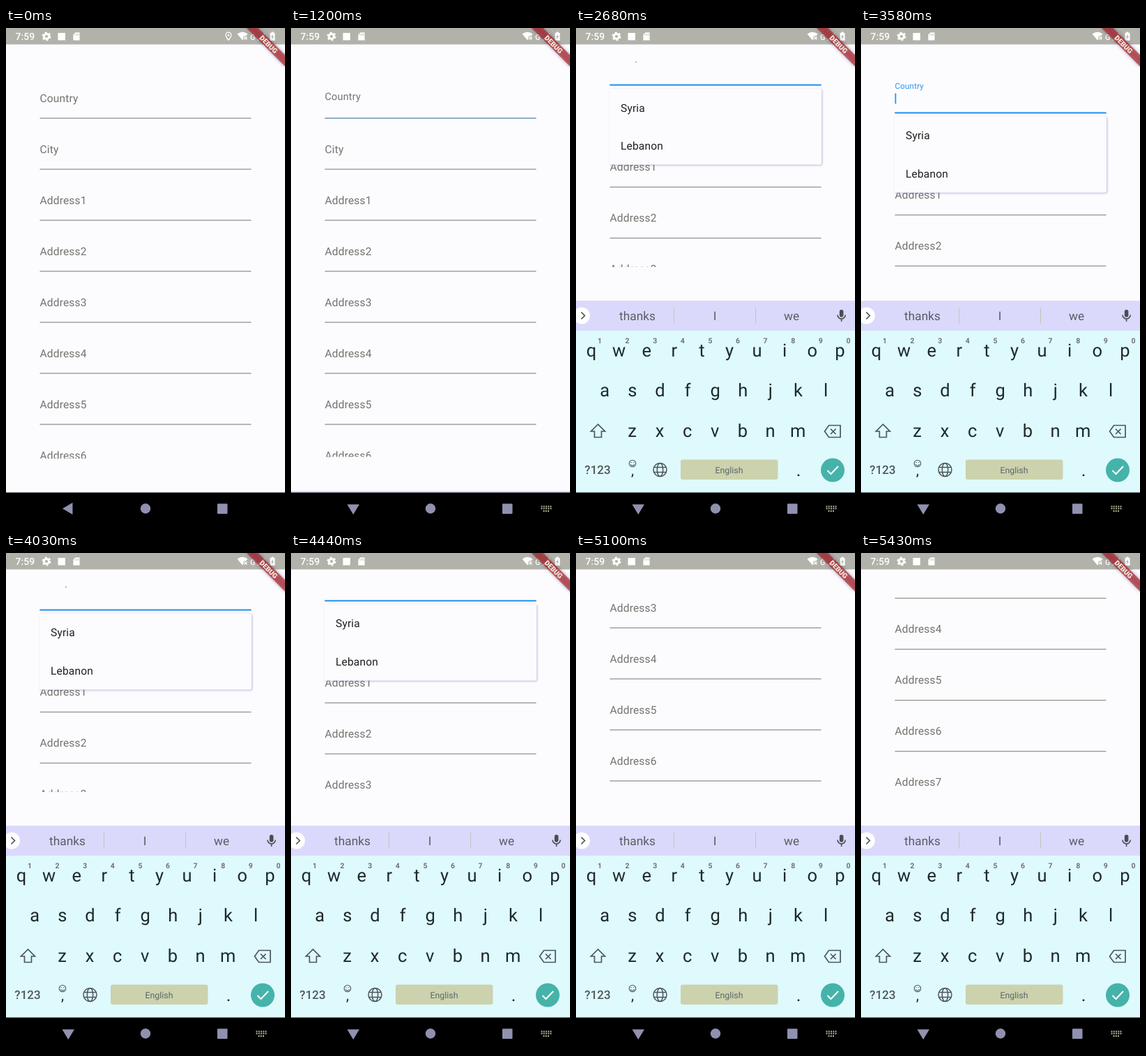
Recreate the animation shown at these times as an HTML page. Size 400 by 711 pixels, loop 6.91 s.

```html
<!DOCTYPE html>
<html lang="en">
<head>
<meta charset="utf-8">
<title>Address form with suggestions</title>
<style>
  html, body { margin: 0; width: 100%; height: 100%; overflow: hidden; background: #fcfcff; }
  svg { display: block; width: 100vw; height: 100vh; font-family: Roboto, sans-serif; }
  text { text-rendering: geometricPrecision; }
  .mid { text-anchor: middle; }
  .label { font-size: 15.57px; letter-spacing: .15px; fill: #73736f; }
  .option { font-size: 15.57px; letter-spacing: .15px; fill: #202020; }
  .word { font-size: 17.3px; fill: #5b5d66; }
  .key { font-size: 25.5px; fill: #1d2a2c; }
  .digit { font-size: 10.5px; font-weight: 700; fill: #70707c; }
  .stroke { fill: none; stroke: #4c5659; stroke-width: 1.7; }
  #panel { filter: drop-shadow(1px 1.5px 1.8px rgba(70, 70, 150, .38)); }
</style>
</head>
<body>
<svg viewBox="0 0 400 711">
  <defs>
    <clipPath id="viewport"><rect id="viewportBox" x="48" y="48" width="304" height="568"/></clipPath>
    <clipPath id="body"><rect y="380" width="400" height="284.5"/></clipPath>
    <filter id="blur" x="-20%" y="-100%" width="140%" height="300%"><feGaussianBlur stdDeviation="3"/></filter>
  </defs>
  <rect width="400" height="711" fill="#fcfcff"/>

  <g clip-path="url(#viewport)">
    <g id="list">
      <rect id="focusLine" x="48.5" y="128" width="303" height="2" fill="#2196f3"/>
      <rect id="caret" x="48.6" y="101" width="1.8" height="15" fill="#2196f3"/>
    </g>
  </g>

  <g id="panel">
    <rect id="panelBox" x="48" y="134" width="304" height="109" rx="2" fill="#fcfcff"/>
    <g id="options">
      <text class="option" x="64" y="167">Syria</text>
      <text class="option" x="64" y="221.5">Lebanon</text>
    </g>
  </g>

  <g clip-path="url(#body)">
    <g id="keyboard">
      <rect y="390" width="400" height="44" fill="#dad9fc"/>
      <rect y="433" width="400" height="232" fill="#dffafd"/>
      <circle cx="8" cy="411.5" r="12" fill="#fff"/>
      <path class="stroke" d="M7.5 406.5l5 5-5 5"/>
      <path d="M140.5 400v23M257.5 400v23" stroke="#c3c3b8"/>
      <text class="word mid" x="88" y="418">thanks</text>
      <text class="word mid" x="199" y="418">I</text>
      <text class="word mid" x="309" y="418">we</text>
      <rect x="377.8" y="403" width="5.6" height="10.5" rx="2.8" fill="#4c4c55"/>
      <path class="stroke" d="M375 410.5a5.6 5.6 0 0 0 11.2 0M380.6 416v4"/>
      <g id="keys"></g>
      <path class="stroke" d="M31.5 567l-10 10h5v8.5h10V577h5z"/>
      <path class="stroke" d="M362.5 568.5H379v17h-16.5l-6-8.5zM365 573.5l7.5 7.5m0-7.5l-7.5 7.5"/>
      <text class="mid" x="31" y="638" font-size="17" font-weight="500" fill="#50585b">?123</text>
      <g class="stroke" style="stroke-width:1.1">
        <circle cx="81" cy="623" r="4.8"/>
        <path d="M78.3 624.2a2.8 2.6 0 0 0 5.4 0M79.2 621v1M82.8 621v1"/>
      </g>
      <text class="key mid" x="81" y="640" style="font-size:21px">,</text>
      <g class="stroke" style="stroke-width:1.5">
        <circle cx="120.5" cy="632" r="9.5"/>
        <ellipse cx="120.5" cy="632" rx="4.2" ry="9.5"/>
        <path d="M112 628.5h17M112 635.5h17"/>
      </g>
      <rect x="150" y="617.5" width="139.5" height="28.5" rx="3" fill="#ccd2ad"/>
      <text class="mid" x="219.5" y="636.5" font-size="12.4" fill="#5c6769">English</text>
      <text class="key mid" x="319" y="640.5">.</text>
      <circle cx="368" cy="632.5" r="17" fill="#45b3aa"/>
      <path d="M360.5 633l5 5 10.5-11" fill="none" stroke="#fff" stroke-width="2"/>
    </g>
  </g>

  <rect y="664.5" width="400" height="47" fill="#000"/>
  <g fill="#9090b0">
    <path id="back" d="M81 687.5l14.5-8.5v17z"/>
    <path id="hide" d="M80.5 681.5h17.5l-8.75 14.5z"/>
    <circle cx="200" cy="687.5" r="7.2"/>
    <rect x="303" y="680.5" width="14.5" height="14.5" rx="1"/>
    <path id="switcher" d="M358.5 684.5h15M358.5 687.5h15M361.5 691h9" fill="none" stroke="#b4b498" stroke-width="1.8" stroke-dasharray="2 1.25"/>
  </g>

  <rect width="400" height="23.5" fill="#b2b2aa"/>
  <g fill="#fff">
    <text x="13.5" y="17" font-size="14" font-weight="500">7:59</text>
    <circle cx="58" cy="12" r="3.6" fill="none" stroke="#fff" stroke-width="3"/>
    <circle cx="58" cy="12" r="5.6" fill="none" stroke="#fff" stroke-width="1.8" stroke-dasharray="3 2.864"/>
    <rect x="74.5" y="7" width="10.5" height="10.5"/>
    <path d="M99.5 6h6.5v12H96V9.5zM99 8.5v2.5M101.5 8v3M104 8v3" stroke="#b2b2aa" stroke-width=".8"/>
    <path id="pin" fill-rule="evenodd" d="M319 5.5a4.5 4.5 0 0 1 4.5 4.5c0 3.2-4.5 8.5-4.5 8.5s-4.5-5.3-4.5-8.5a4.5 4.5 0 0 1 4.5-4.5zm0 1.3a3.2 3.2 0 0 0-3.2 3.2c0 2 3.2 6.2 3.2 6.2s3.2-4.2 3.2-6.2a3.2 3.2 0 0 0-3.2-3.2zm0 2a1.4 1.4 0 1 1-.01 0z"/>
    <path d="M331.5 8.5q7.5-5.5 15 0l-2.5 3h-3.5v4l-1.5 2z"/>
    <path d="M341.5 12.5l4 4m0-4l-4 4" stroke="#fff" stroke-width="1.2"/>
    <text x="350" y="16.5" font-size="11" font-weight="500">G</text>
    <path d="M360 17.5l10.5-10.5v10.5z"/>
    <path fill-rule="evenodd" d="M380.5 5.5h3v1.5h2v11h-7v-11h2zm2 3.5l-2.5 4h1.5v3l2.5-4h-1.5z"/>
  </g>

  <g transform="translate(400 0) scale(.973) rotate(45)">
    <rect x="-40" y="28" width="80" height="12" fill="#202060" opacity=".4" filter="url(#blur)"/>
    <rect x="-40" y="28" width="80" height="12" fill="#b71c1c" fill-opacity=".63"/>
    <text class="mid" y="37.7" font-size="10.2" font-weight="900" fill="#f6f0e0">DEBUG</text>
  </g>
</svg>

<script>
const LOOP = 6910, ROW = 73;
const $ = id => document.getElementById(id);
const clamp = x => Math.min(1, Math.max(0, x));
const progress = (t, start, end) => clamp((t - start) / (end - start));
const easeOut = p => 1 - (1 - p) ** 3;
const smooth = p => p * p * (3 - 2 * p);
const linear = p => p;
const show = (id, on) => $(id).setAttribute('visibility', on ? 'visible' : 'hidden');

function add(parent, tag, attrs, text = '') {
  const node = document.createElementNS('http://www.w3.org/2000/svg', tag);
  for (const name in attrs) node.setAttribute(name, attrs[name]);
  node.textContent = text;
  parent.append(node);
  return node;
}

// Form rows, placed below the focus line and caret
const names = ['Country', 'City', ...Array.from({ length: 10 }, (_, i) => 'Address' + (i + 1))];
const labels = names.map((name, i) => {
  const line = add($('list'), 'rect', { x: 48.5, y: 128.4 + ROW * i, width: 303, height: 1.3, fill: '#94948f' });
  $('list').prepend(line);
  return add($('list'), 'text', { class: 'label', x: 48.5, y: 105.6 + ROW * i }, name);
});

[['qwertyuiop', 22, 469.5], ['asdfghjkl', 41.3, 527], ['zxcvbnm', 80.5, 584.5]].forEach(([row, x, y], r) => {
  [...row].forEach((letter, i) => {
    add($('keys'), 'text', { class: 'key mid', x: x + 39.6 * i, y }, letter);
    if (r === 0) add($('keys'), 'text', { class: 'digit mid', x: 34 + 39.6 * i, y: 450.5 }, (i + 1) % 10);
  });
});

// [start, end, from, to, easing] for each drag or fling of the list
const scrolls = [
  [10, 330, 0, 146, easeOut],
  [460, 780, 146, 0, easeOut],
  [2360, 2680, 0, 47.5, easeOut],
  [2970, 3290, 47.5, 0, easeOut],
  [3579, 3580, 0, 7.5, linear],
  [3580, 4030, 7.5, 47.5, linear],
  [4030, 4810, 47.5, 72.4, linear],
  [4810, 5430, 72.4, 356.4, easeOut],
];

function scrollAt(t) {
  const last = scrolls.filter(s => t >= s[0]).pop();
  if (!last) return 0;
  const [start, end, from, to, ease] = last;
  return from + (to - from) * ease(progress(t, start, end));
}

function draw(t) {
  const offset = scrollAt(t);
  const focus = smooth(progress(t, 1140, 1320));
  const rise = easeOut(progress(t, 1200, 1520));
  const open = smooth(progress(t, 1400, 1730));
  const typing = t >= 1160;

  $('list').setAttribute('transform', `translate(0 ${-offset})`);
  $('viewportBox').setAttribute('height', 568 - 274 * rise);
  $('focusLine').setAttribute('opacity', focus);
  labels[0].style.fontSize = 15.57 * (1 - .25 * focus) + 'px';
  labels[0].style.fill = focus > .3 ? '#2f95ee' : '';
  labels[0].setAttribute('y', 105.6 - 10.8 * focus);
  show('caret', t >= 3000 && t < 4000);

  // The suggestions leave together with the field they hang on
  show('panel', open > 0 && offset < 85);
  $('panel').setAttribute('transform', `translate(0 ${-offset})`);
  $('panelBox').setAttribute('height', 109 * open);
  $('options').setAttribute('opacity', open);

  show('keyboard', typing);
  $('keyboard').setAttribute('transform', `translate(0 ${275 * (1 - rise)})`);
  show('back', !typing);
  show('hide', typing);
  show('switcher', typing);
  show('pin', !typing);
}

function tick() {
  draw(performance.now() % LOOP);
  requestAnimationFrame(tick);
}
tick();
</script>
</body>
</html>
```
